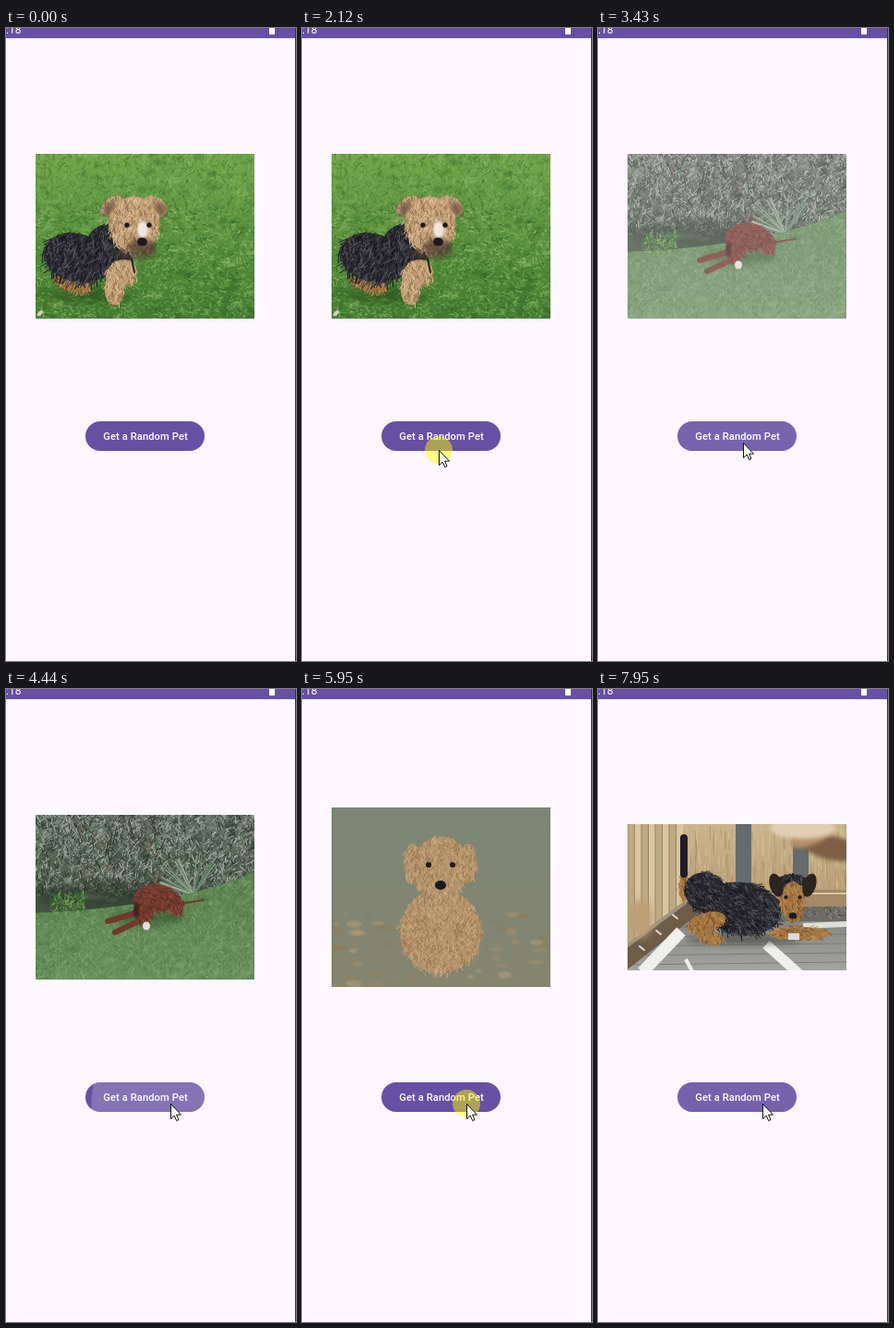
An HTML page with a canvas for the animation above (8000 ms loop, 314x684 px).

```html
<!DOCTYPE html>
<html lang="en">
<head>
<meta charset="utf-8">
<title>Random Pet</title>
<style>
html, body { margin: 0; width: 100%; height: 100%; overflow: hidden; background: #fef7ff; }
canvas { display: block; }
</style>
</head>
<body>
<canvas id="stage" width="314" height="684"></canvas>
<script>
const ctx = document.getElementById('stage').getContext('2d');
const LOOP = 8000;
const LEFT = 32, WIDTH = 237;
const PURPLE = '#6750a4';

const BLOND = ['#c3a077', '#e2c79d', '#a5825a', '#d3b388', '#86684a'];
const TAN = ['#a0733f', '#c29258', '#775330', '#b58449'];
const BLACK = ['#292930', '#15161b', '#42424b', '#5a5861', '#1d1d23'];
const RUST = ['#71382e', '#8d4d3d', '#572a23', '#7d4135'];
const SAND = ['#b4936b', '#c9aa82', '#97774f'];
const LAWN = ['#83b35b', '#36702b', '#6da148', '#4a8638', '#9bc474', '#2d6124'];
const MEADOW = ['#628957', '#87aa78', '#4c7544', '#749768'];
const LEAVES = ['#3b493c', '#8d9a8d', '#566351', '#2c382e', '#abb3ab'];
const GRAVEL = ['#6c6b66', '#94938a', '#4c4c47'];

let seed = 7;
const rand = () => (seed = (seed * 16807) % 2147483647) / 2147483647;
const pick = list => list[Math.floor(rand() * list.length)];
const ramp = (t, a, b) => Math.max(0, Math.min(1, (t - a) / (b - a)));

function oval(g, color, x, y, rx, ry = rx, { tilt = 0, blur = 0 } = {}) {
  g.filter = blur ? `blur(${blur}px)` : 'none';
  g.fillStyle = color;
  g.beginPath();
  g.ellipse(x, y, rx, ry, tilt, 0, 2 * Math.PI);
  g.fill();
  g.filter = 'none';
}

function line(g, color, width, x0, y0, x1, y1) {
  g.strokeStyle = color;
  g.lineWidth = width;
  g.beginPath();
  g.moveTo(x0, y0);
  g.lineTo(x1, y1);
  g.stroke();
}

function box(g, color, x, y, w, h) {
  g.fillStyle = color;
  g.fillRect(x, y, w, h);
}

function shade(g, y0, y1, from, to) {
  const grad = g.createLinearGradient(0, y0, 0, y1);
  grad.addColorStop(0, from);
  grad.addColorStop(1, to);
  box(g, grad, LEFT, y0, WIDTH, y1 - y0);
}

function strand(g, colors, x, y, length, angle, spread) {
  const a = angle + (rand() - .5) * spread, l = length * (.4 + rand());
  line(g, pick(colors), 1, x, y, x + Math.cos(a) * l, y + Math.sin(a) * l);
}

// Short strokes over a rectangle: grass, leaves, grain, gravel.
function field(g, colors, x, y, w, h, { density = .12, length = 4, angle = -1.4, spread = 2.4, alpha = 1 } = {}) {
  g.globalAlpha = alpha;
  for (let i = 0; i < w * h * density; i++) {
    strand(g, colors, x + rand() * w, y + rand() * h, length, angle, spread);
  }
  g.globalAlpha = 1;
}

// Soft light and dark patches.
function dapple(g, colors, x, y, w, h, count) {
  g.globalAlpha = .4;
  for (let i = 0; i < count; i++) {
    oval(g, pick(colors), x + rand() * w, y + rand() * h, 2 + rand() * 7, 1 + rand() * 3, { blur: 1 });
  }
  g.globalAlpha = 1;
}

// An ellipse of fur whose strands soften its edge.
function fur(g, colors, x, y, rx, ry, { tilt = 0, angle = 1.6, length = 4 } = {}) {
  oval(g, colors[0], x, y, rx - 1, ry - 1, { tilt });
  for (let i = 0; i < rx * ry * .6; i++) {
    const a = rand() * 2 * Math.PI, r = Math.sqrt(rand());
    const u = Math.cos(a) * rx * r, v = Math.sin(a) * ry * r;
    strand(g, colors, x + u * Math.cos(tilt) - v * Math.sin(tilt), y + u * Math.sin(tilt) + v * Math.cos(tilt),
      length, angle, 1.6);
  }
}

function face(g, x, eyeY, gap, noseX, noseY, size) {
  for (const side of [-1, 1]) oval(g, '#211b1a', x + side * gap, eyeY, size * .6);
  oval(g, '#1b1b1f', noseX, noseY, size * 1.2, size);
}

function photo(y, h, paint) {
  const image = document.createElement('canvas');
  image.width = WIDTH;
  image.height = h;
  const g = image.getContext('2d');
  g.translate(-LEFT, -y);
  g.lineCap = 'round';
  paint(g);
  return { image, y };
}

const terrier = photo(136, 178, g => {
  shade(g, 136, 314, '#73a64b', '#447a31');
  dapple(g, LAWN, LEFT, 136, WIDTH, 178, 260);
  field(g, LAWN, LEFT, 136, WIDTH, 65, { alpha: .45 });
  field(g, LAWN, LEFT, 195, WIDTH, 119, { alpha: .65, spread: 4 });
  oval(g, '#244d1aa0', 92, 288, 46, 8, { blur: 5 });
  fur(g, TAN, 72, 276, 22, 9, { tilt: .3 });
  fur(g, BLACK, 76, 248, 37, 27, { tilt: .25, angle: 2, length: 7 });
  fur(g, BLACK, 110, 240, 25, 29, { angle: 1.9, length: 7 });
  fur(g, BLOND, 125, 265, 18, 15, { tilt: -.5, length: 6 });
  fur(g, BLOND, 117, 282, 11, 18);
  oval(g, '#54413580', 140, 244, 22, 7, { blur: 2 });
  for (const side of [-1, 1]) {
    fur(g, BLOND, 139 + side * 23, 192, 15, 10, { tilt: side * .6 });
    oval(g, '#6b5140c0', 139 + side * 28, 196, 6, 9, { tilt: -side * .4, blur: 2 });
  }
  fur(g, BLOND, 139, 212, 28, 31, { length: 5 });
  oval(g, '#4d3b30c0', 147, 237, 16, 8, { blur: 2 });
  oval(g, '#eee5dc', 148, 218, 6, 9, { blur: 1 });
  face(g, 143, 213, 12, 147.5, 231, 4.5);
  line(g, '#22262f', 2, 136, 249, 139, 264);
  oval(g, '#dccdbc', 37, 308, 4, 2, { tilt: -.8 });
});

const setter = photo(136, 178, g => {
  shade(g, 136, 260, '#6c786c', '#3f4d3c');
  dapple(g, LEAVES, LEFT, 136, WIDTH, 95, 200);
  field(g, LEAVES, LEFT, 136, WIDTH, 90, { density: .15, length: 5 });
  field(g, ['#6e5b4d', '#37372f'], 80, 136, 90, 85, { density: .01, length: 14 });
  oval(g, '#26342690', 110, 224, 82, 14, { blur: 6 });
  for (let i = 0; i < 26; i++) {
    const a = -Math.PI * (.05 + .9 * rand());
    line(g, pick(['#a0b39a', '#66806a', '#87a082']), 1.2, 203, 222, 203 + 38 * Math.cos(a), 222 + 42 * Math.sin(a));
  }
  g.save();
  g.beginPath();
  g.moveTo(LEFT, 242);
  g.quadraticCurveTo(180, 236, LEFT + WIDTH, 198);
  g.lineTo(LEFT + WIDTH, 314);
  g.lineTo(LEFT, 314);
  g.clip();
  shade(g, 198, 314, '#587e4b', '#6b9160');
  dapple(g, MEADOW, LEFT, 198, WIDTH, 116, 180);
  field(g, MEADOW, LEFT, 198, WIDTH, 116, { density: .15, alpha: .7 });
  g.restore();
  field(g, LAWN, 48, 222, 38, 20, { density: .25, alpha: .7 });
  oval(g, '#2f4b2890', 155, 247, 42, 7, { blur: 4 });
  line(g, RUST[0], 2, 188, 232, 214, 228);
  line(g, RUST[0], 6, 148, 240, 110, 251);
  line(g, RUST[0], 6, 152, 247, 118, 263);
  fur(g, RUST, 162, 226, 25, 16, { angle: .4 });
  fur(g, RUST, 184, 234, 9, 11);
  fur(g, RUST, 149, 238, 10, 14);
  oval(g, '#40211d', 141, 239, 3, 8, { blur: 1 });
  oval(g, '#e4e0d7', 152, 256, 4, 4.5);
});

const retriever = photo(128, 194, g => {
  shade(g, 128, 322, '#7c8676', '#86856e');
  dapple(g, SAND, LEFT, 240, WIDTH, 82, 60);
  fur(g, SAND, 150, 262, 45, 46);
  for (const side of [-1, 1]) fur(g, SAND, 150 + side * 30, 188, 10, 22);
  fur(g, SAND, 150, 193, 31, 35);
  face(g, 150, 190, 13, 150, 212, 5);
});

const pup = photo(146, 158, g => {
  shade(g, 146, 235, '#cbb58d', '#b39b73');
  field(g, ['#9d815b', '#dbc9a1'], 92, 146, 177, 70, { density: .02, length: 15, angle: 1.57, spread: .12, alpha: .5 });
  for (const gap of [149, 211]) box(g, '#666b6d', gap, 146, 17, 66);
  box(g, '#a38b65', 150, 217, 119, 18);
  line(g, '#d8c69d', 2, 150, 221, 269, 221);
  box(g, GRAVEL[0], LEFT, 235, WIDTH, 16);
  field(g, GRAVEL, LEFT, 235, WIDTH, 14, { length: 2, spread: 6 });
  shade(g, 251, 304, '#868783', '#a3a49f');
  for (let y = 258; y < 304; y += 10) line(g, '#737570', .8, LEFT, y, LEFT + WIDTH, y - 3);

  for (let i = 0; i < 8; i++) {
    const x = LEFT + i * 7.5;
    box(g, i % 2 ? '#d9c7a3' : '#c0aa83', x, 146, 8, 134 - i * 6);
    line(g, '#97815e', 1, x, 146, x, 280 - i * 6);
  }
  line(g, '#6d5c46', 20, 26, 295, 96, 240);
  line(g, '#a1937d', 4, 28, 280, 94, 231);
  for (let i = 0; i < 3; i++) line(g, '#d8dde0', 2, 45 + i * 18, 278 - i * 17, 50 + i * 18, 282 - i * 17);
  oval(g, '#bb9e76', 45, 248, 14, 21, { blur: 4 });

  g.lineCap = 'butt';
  line(g, '#efefeb', 13, 90, 262, 48, 306);
  line(g, '#efefeb', 11, 182, 276, 218, 308);
  line(g, '#efefeb', 4, 95, 292, 102, 305);
  line(g, '#dfdfda', 6, 222, 256, 269, 254);
  g.lineCap = 'round';

  oval(g, '#3f413ea0', 158, 271, 62, 5, { blur: 3 });
  fur(g, TAN, 93, 214, 6, 16);
  line(g, BLACK[4], 8, 93, 161, 93, 200);
  fur(g, BLACK, 117, 220, 25, 22, { tilt: .5, angle: .7, length: 5 });
  fur(g, BLACK, 155, 237, 45, 29, { tilt: .15, angle: .7, length: 5 });
  fur(g, TAN, 117, 252, 22, 11, { tilt: -.3 });
  fur(g, TAN, 122, 268, 16, 7, { tilt: .2 });
  fur(g, TAN, 218, 264, 33, 8, { angle: .2 });
  fur(g, BLACK, 210, 212, 20, 13);
  fur(g, TAN, 211, 230, 14, 23);
  for (const side of [-1, 1]) oval(g, '#2b241f', 211 + side * 18, 212, 7, 13, { tilt: side * .3, blur: .5 });
  face(g, 211, 225, 7.5, 211, 245, 3.5);
  box(g, '#d9dcdc', 206, 264, 12, 7);

  oval(g, '#7e5f45', 254, 172, 34, 13, { tilt: .2, blur: 2 });
  oval(g, '#b58f68', 232, 158, 26, 10, { tilt: -.4, blur: 2 });
  oval(g, '#e0cfb2', 222, 150, 36, 12, { blur: 2 });
});

const shots = [
  { start: 0, end: 3220, shot: terrier },
  { start: 3290, end: 4660, shot: setter, fade: 180 },
  { start: 5140, end: 6010, shot: retriever },
  { start: 6090, end: LOOP, shot: pup, fade: 80 }
];

// The first press takes longer to reach the button.
const presses = [
  { at: 2120, lag: 640 },
  { at: 4240, lag: 0 },
  { at: 5880, lag: 0 },
  { at: 7250, lag: 0 }
];

// Glide in, swing across the button, then nudge right.
function pointerAt(t) {
  const enter = Math.sin(ramp(t, 260, 1040) * Math.PI / 2);
  const swing = ramp(t, 1110, 1720);
  const nudge = ramp(t, 3150, 3650) ** 2;
  return [
    Math.round(230 - 124 * enter + 42 * swing + 30 * nudge),
    Math.round(628 - 199 * enter + 27 * swing - 15 * Math.sin(swing * 2 * Math.PI) - 8 * ramp(t, 3150, 3430))
  ];
}

function drawStatusBar() {
  box(ctx, PURPLE, 0, 0, 314, 11);
  box(ctx, '#fff', 285, 0, 6, 7);
  ctx.font = '12px Roboto, sans-serif';
  ctx.fillText(':18', 0, 6);
  box(ctx, '#35313a', 313, 0, 1, 684);
}

function drawPhoto(t) {
  const current = shots.find(s => t >= s.start && t < s.end);
  if (!current) return;
  const { start, shot, fade } = current;
  ctx.globalAlpha = fade ? ramp(t, start, start + fade) : 1;
  ctx.drawImage(shot.image, LEFT, shot.y);
  ctx.globalAlpha = 1;
}

function drawButton(t) {
  ctx.save();
  ctx.beginPath();
  ctx.roundRect(86, 425, 129, 32, 16);
  ctx.fillStyle = PURPLE;
  ctx.fill();
  ctx.clip();
  for (const { at, lag } of presses) {
    const age = t - at - lag;
    if (age < 100 || age > 910) continue;
    const glow = .2 * (1 - ramp(age, 490, 910));
    oval(ctx, `rgba(255,255,255,${glow})`, ...pointerAt(at), 30 + 110 * ramp(age, 100, 300));
  }
  ctx.restore();
  ctx.fillStyle = '#fff';
  ctx.font = '500 11.2px Roboto, sans-serif';
  ctx.letterSpacing = '0.08px';
  ctx.textAlign = 'center';
  ctx.fillText('Get a Random Pet', 151, 445);
  ctx.textAlign = 'left';
  ctx.letterSpacing = '0px';
}

function drawPointer(t) {
  if (t < 260) return;
  const [x, y] = pointerAt(t);
  if (presses.some(({ at }) => t >= at && t < at + 140)) oval(ctx, 'rgba(255,255,0,.47)', x, y, 15);
  ctx.save();
  ctx.translate(x + .5, y + .5);
  const arrow = new Path2D('M0 0V16L3.7 12.5 6.2 18 8.5 17 6.1 11.6H11Z');
  ctx.fillStyle = '#fff';
  ctx.fill(arrow);
  ctx.strokeStyle = '#111';
  ctx.lineWidth = 1;
  ctx.stroke(arrow);
  ctx.restore();
}

function draw(now) {
  const t = now % LOOP;
  box(ctx, '#fef7ff', 0, 0, 314, 684);
  drawPhoto(t);
  drawButton(t);
  drawStatusBar();
  drawPointer(t);
}

const began = performance.now();
function tick() {
  draw(performance.now() - began);
  requestAnimationFrame(tick);
}
tick();
</script>
</body>
</html>
```
